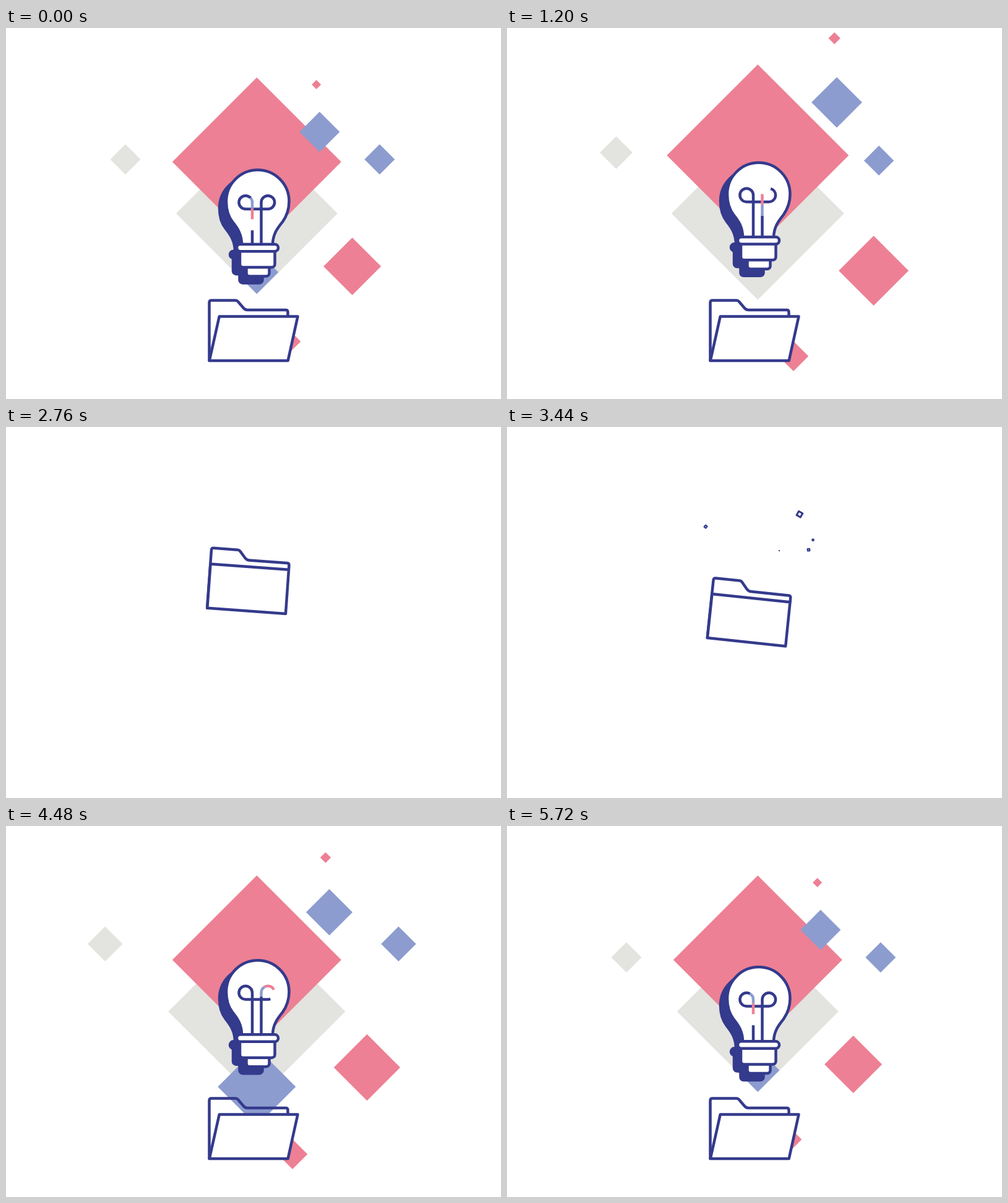
These frames come from a looping animation (800 px wide and 600 px high, 5.76 s). An HTML page with a canvas:

```html
<!DOCTYPE html>
<html lang="en">
<head>
<meta charset="utf-8">
<title>Idea folder</title>
<style>
html, body { margin: 0; width: 100%; height: 100%; overflow: hidden; background: #fff; }
canvas { display: block; }
</style>
</head>
<body>
<canvas id="stage" width="800" height="600"></canvas>
<script>
const ctx = document.getElementById('stage').getContext('2d');
const LOOP = 5760, TAU = Math.PI * 2, DEG = TAU / 360;
const NAVY = '#343a8c', RED = '#ed8094', BLUE = '#8c9ccf', GREY = '#e3e3df';
const CX = 405.3, ANCHOR = 353; // the diamonds grow from this point

const ramp = (t, start, length) => Math.min(1, Math.max(0, (t - start) / length));
const mix = (a, b, u) => a + (b - a) * u;
const smooth = u => u * u * (3 - 2 * u);
const easeOut = (u, power = 3) => 1 - (1 - u) ** power;
const easeBack = u => 1 + 2.7 * (u - 1) ** 3 + 1.7 * (u - 1) ** 2;

// Slow breathing after the entry: shrink to rest, then swell before the exit
const settle = t => (1 - ramp(t, 4400, 1100)) ** 2;
const swell = t => ramp(t, 5800, 950) ** 2;

function diamond(x, y, h, color) {
  if (h <= 0) return;
  ctx.fillStyle = color;
  ctx.beginPath();
  ctx.moveTo(x, y - h);
  ctx.lineTo(x + h, y);
  ctx.lineTo(x, y + h);
  ctx.lineTo(x - h, y);
  ctx.fill();
}

// Small diamonds in order of exit: offset from the anchor, half size, entry time
const smalls = [
  { x: 198.5, y: -140.5, h: 24.5, enter: 3812, color: BLUE },
  { x: -212.3, y: -140.5, h: 24.5, enter: 3853, color: GREY },
  { x: 50, y: 154, h: 21, enter: 3995, color: RED },
  { x: 154.3, y: 32.5, h: 46.5, enter: 3950, color: RED },
  { x: 101.5, y: -185, h: 32.5, enter: 3995, color: BLUE },
  { x: 96.3, y: -261.5, h: 7.5, enter: 3779, color: RED }
];

function smallDiamond(d, i, t) {
  const s = (1 + .18 * settle(t) + .3 * swell(t))
    * smooth(ramp(t, d.enter, 450)) * (1 - ramp(t, 6740 + 35 * i, 450) ** 2);
  diamond(CX + d.x * s, ANCHOR + d.y * s, d.h * s, d.color);
}

function diamonds(t) {
  const leave = 1 - ramp(t, 6960, 320) ** 2;
  const grey = (130.5 + 17 * settle(t) ** 2 + 9 * swell(t)) * easeOut(ramp(t, 3640, 360)) * leave;
  const red = (136.5 + 10.5 * swell(t)) * easeBack(ramp(t, 3580, 420)) * leave;
  const blue = (63 - 28 * smooth(ramp(t, 4700, 740)))
    * smooth(ramp(t, 3800, 280)) * (1 - smooth(ramp(t, 6600, 300)));
  diamond(CX, 300, grey, GREY);
  diamond(CX, ANCHOR - red, red, RED);
  diamond(CX, mix(224, 360 + blue, smooth(ramp(t, 4080, 420))), blue, BLUE);
  smalls.forEach((d, i) => smallDiamond(d, i, t));
}

function ring(t) {
  if (t < 3450 || t > 4190) return;
  const r = 270 * (1 - Math.exp(-.0108 * (t - 3450)));
  const step = r * TAU / 49;
  ctx.save();
  ctx.strokeStyle = NAVY;
  ctx.lineWidth = 5.6 * ramp(t, 3450, 60) * (1 - ramp(t, 4100, 90));
  ctx.setLineDash([.7, step - .7]);
  ctx.lineDashOffset = .35;
  ctx.beginPath();
  ctx.arc(405.5, 300, r, -TAU / 4, TAU * .749);
  ctx.stroke();
  ctx.restore();
}

// Confetti: first place, second place, size, angle
const bits = [
  [473, 141, 410, 217, 15, 30],
  [321, 161, 373.5, 244, 10, 40],
  [487.5, 198.5, 465, 237, 14, -5],
  [494.5, 182.5, 495.5, 279, 17, 10],
  [440, 200, 429.5, 228.5, 10, 25]
];

function confetti(t) {
  const u = (t - 3440) / 640;
  ctx.strokeStyle = NAVY;
  bits.forEach(([x0, y0, x1, y1, size, angle], i) => {
    const s = size * ramp(t, 3380 + 15 * i, 90) * (1 - ramp(t, 4080, 160)), h = s * .35;
    if (!s) return;
    ctx.save();
    ctx.translate(mix(x0, x1, u), mix(y0, y1, u));
    ctx.rotate(angle * DEG);
    ctx.lineWidth = Math.max(2.2, s * .3);
    ctx.beginPath();
    if (size === 10 && s > 7) {
      ctx.moveTo(-h, -h); ctx.lineTo(h, h);
      ctx.moveTo(h, -h); ctx.lineTo(-h, h);
    } else ctx.rect(-h, -h, 2 * h, 2 * h);
    ctx.stroke();
    ctx.restore();
  });
}

function box(x, y, w, h, radii) {
  const path = new Path2D();
  path.roundRect(x, y, w, h, radii);
  return path;
}

const glass = new Path2D('M381 351C381 334 374 324 366 314C359 305 356 294 356 281A50.75 51 0 0 1 457.5 281C457.5 294 454 304 447 314C439 324 431 334 431 351Z');
const bulbParts = [
  glass,
  box(388.5, 386, 37, 16, [0, 0, 5, 5]),
  box(378, 361, 56.5, 26.5, [0, 0, 5, 5]),
  box(373, 350.2, 67, 11.5, 5.7)
];

const WIRE = 271;
const wire = new Path2D('M398 349V282.5A10.8 10.8 0 1 0 387.2 293.3H423.3A10.8 10.8 0 1 0 412.5 282.5V349');

function strokePath(path, fill) {
  if (fill) { ctx.fillStyle = fill; ctx.fill(path); }
  ctx.strokeStyle = NAVY;
  ctx.lineWidth = 4.5;
  ctx.stroke(path);
}

function wirePart(start, length, color) {
  ctx.setLineDash([length, WIRE - length]);
  ctx.lineDashOffset = -start;
  ctx.strokeStyle = color;
  ctx.stroke(wire);
}

// A gap, a red and a blue piece run along the filament
function filament(t) {
  const start = 84 * Math.exp((4080 - t) / 290) - .09 * (t - LOOP) - 232;
  ctx.save();
  ctx.lineCap = 'butt';
  wirePart(start + 35, WIRE - 53, NAVY);
  wirePart(start, 17.5, RED);
  wirePart(start + 17.5, 17.5, BLUE);
  ctx.restore();
}

function bulb(t) {
  if (t < 3760 || t > 7360) return;
  const u = ramp(t, 3760, 600), out = ramp(t, 6960, 400) ** 2;
  const sway = -7.2 - 14.8 * Math.cos(Math.PI * (t - 4950) / 1250);
  const drop = 128 * (1 - easeOut(u, 5)) + 130 * out;
  const size = mix(.3, 1, easeOut(u)) * (1 - .7 * out);
  const depth = mix(2, 11, u);
  ctx.save();
  ctx.translate(407, 404 + sway + drop);
  ctx.rotate(1.6 * DEG * Math.sin(Math.PI * u));
  ctx.scale(size, size);
  ctx.translate(-407, -404);

  ctx.save();
  ctx.translate(-depth, depth);
  bulbParts.forEach(p => strokePath(p, NAVY));
  ctx.restore();

  strokePath(glass, '#fff');
  filament(t);
  bulbParts.slice(1).forEach(p => strokePath(p, '#fff'));
  ctx.restore();
}

const folderBack = new Path2D('M328.5 538V444Q328.5 440.5 332 440.5H371Q373.5 440.5 375 442.5L383.5 452.5Q386.5 456 390 456H452Q455.5 456 455.5 459.5V466');

function inFolder(t, draw) {
  const dip = 34 * smooth(ramp(t, 1540, 200));
  const jump = 224 * easeOut(ramp(t, 1780, 730));
  const hop = 68 * Math.sin(Math.PI * ramp(t, 2350, 560));
  const fall = 190 * smooth(ramp(t, 3480, 300));
  const wiggle = 8 * ramp(t, 2400, 80) * (1 - ramp(t, 3500, 100));
  ctx.save();
  ctx.translate(392, 489 + dip - jump - hop + fall);
  ctx.rotate(wiggle * DEG * Math.sin(TAU * (t - 2400) / 332));
  ctx.translate(-392, -489);
  draw();
  ctx.restore();
}

function folderFront(t) {
  const lean = 16 * (1 - smooth(ramp(t, 1800, 304)) + easeBack(ramp(t, 3540, 320)));
  strokePath(new Path2D(`M${328.7 + lean} 466.5H${455.5 + lean}L455.7 538H328.7Z`), '#fff');
}

function draw(now) {
  const t = now % LOOP;
  const scene = t < 1840 ? t + LOOP : t; // the open scene runs across the loop's seam
  ctx.clearRect(0, 0, 800, 600);
  ctx.lineJoin = ctx.lineCap = 'round';
  ring(t);
  diamonds(scene);
  confetti(t);
  inFolder(t, () => strokePath(folderBack));
  bulb(scene);
  inFolder(t, () => folderFront(t));
}

const began = performance.now();
function tick() {
  draw(performance.now() - began);
  requestAnimationFrame(tick);
}
tick();
</script>
</body>
</html>
```
